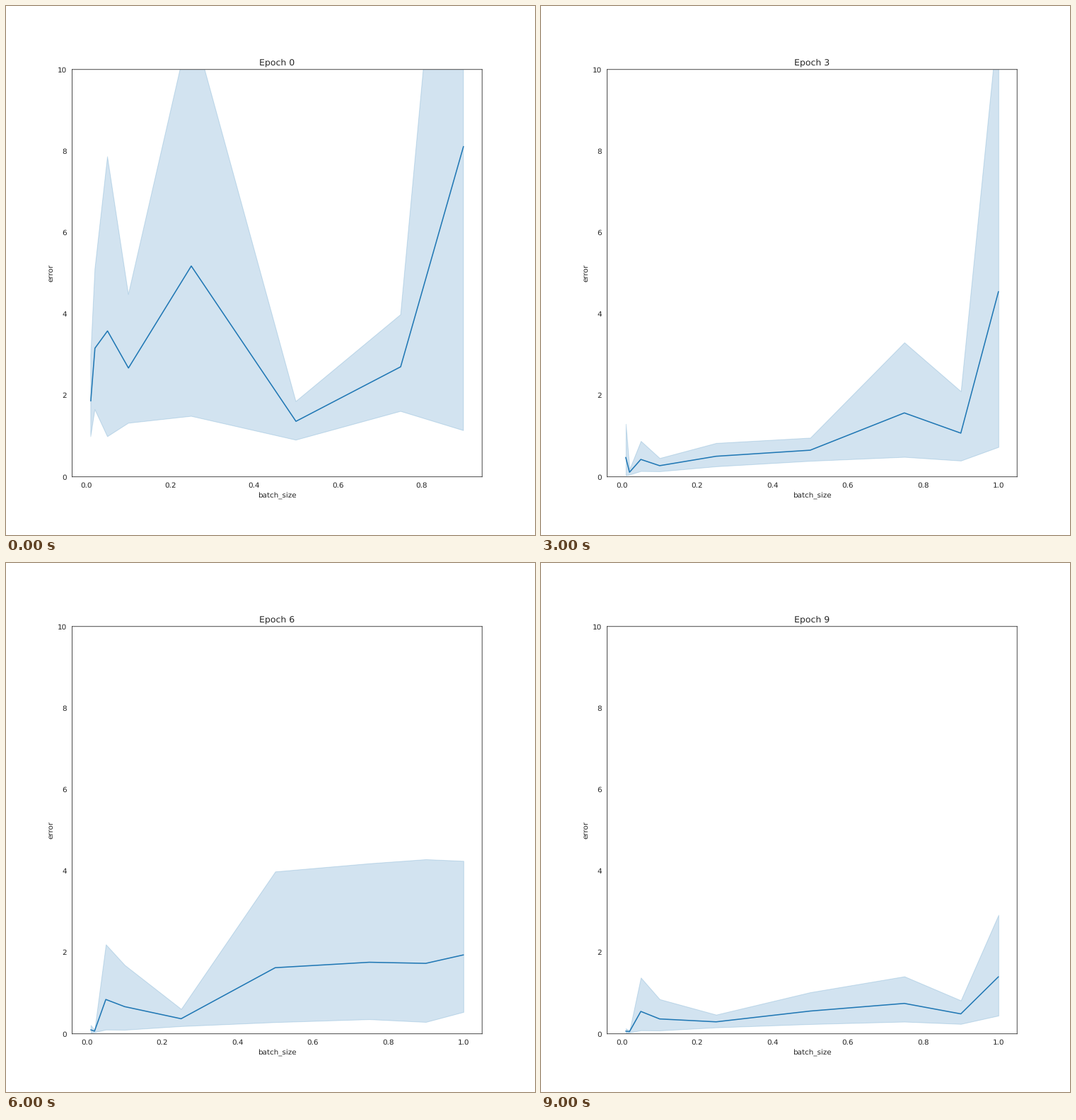
Write a matplotlib script that moves like this. It is 748 px wide and 748 px high and loops after 10 s.

```python
import numpy as np
import matplotlib.pyplot as plt
from matplotlib.animation import FuncAnimation

INK = "0.15"
plt.rcParams.update({
    "font.family": "DejaVu Sans",
    "text.hinting": "none",
    "text.color": INK,
    "axes.labelcolor": INK,
    "axes.edgecolor": INK,
    "xtick.color": INK,
    "ytick.color": INK,
    "xtick.bottom": False,
    "ytick.left": False,
    "axes.axisbelow": True,
    "lines.solid_capstyle": "round",
})

EPOCHS = 10
BLUE = "#1f77b4"
SIZES = [0.01, 0.02, 0.05, 0.1, 0.25, 0.5, 0.75, 0.9, 1.0]

# Lower edge after one epoch; it then decays with a power of the epoch
FLOOR = np.array([0.06, 0.09, 0.23, 0.22, 0.42, 0.64, 0.8, 0.65, 1.2])
DECAY = 0.45

# Key points of the upper edge; the other epochs lie between these
PEAKS = {
    0: [2.98, 5.1, 7.86, 4.48, 11.2, 1.85, 3.98, 20.7],
    1: [2.44, 2.74, 0.74, 1.58, 1.4, 4.49, 2.48, 5.86, 12.16],
    3: [1.3, 0.19, 0.88, 0.46, 0.83, 0.96, 3.3, 2.1, 11.35],
    4: [0.18, 0.16, 0.46, 0.57, 7.01, 1.99, 10.75, 4.44, 7.13],
    5: [0.3, 0.12, 0.61, 0.74, 0.7, 1.07, 6.36, 7.59, 5.33],
    7: [0.13, 0.07, 3.78, 2.64, 0.52, 6.9, 2.01, 0.98, 3.16],
    9: [0.13, 0.08, 1.38, 0.85, 0.47, 1.02, 1.41, 0.82, 2.92],
}


def upper(epoch):
    if epoch in PEAKS:
        return np.array(PEAKS[epoch])
    return np.mean([PEAKS[epoch - 1], PEAKS[epoch + 1]], axis=0)


def lower(epoch):
    if epoch == 0:  # untrained: a ripple with no trend
        i = np.arange(len(PEAKS[0]))
        return 1.27 + 0.38 * np.cos(2 * np.pi * (i - 1) / 2.6)
    return FLOOR * epoch ** -DECAY


def band(epoch):
    """Lower edge, mean and upper edge; a wide band has a lower mean."""
    low, high = lower(epoch), upper(epoch)
    share = 0.34 + 0.3 * low / high
    return low, low + share * (high - low), high


fig, ax = plt.subplots(figsize=(10, 10), dpi=74.8)


def draw(epoch):
    ax.clear()
    low, mean, high = band(epoch)
    x = SIZES[:len(mean)]
    ax.plot(x, mean, color=BLUE, lw=1.5)
    ax.fill_between(x, low, high, color=BLUE, alpha=0.2)
    ax.set_ylim(0, 10)
    ax.set_xlabel("batch_size")
    ax.set_ylabel("error")
    ax.set_title(f"Epoch {epoch}")
    for spine in ax.spines.values():
        spine.set_snap(False)
    return []


anim = FuncAnimation(fig, draw, frames=EPOCHS, interval=1000,
                     init_func=lambda: draw(0), repeat=True)
plt.show()
```
